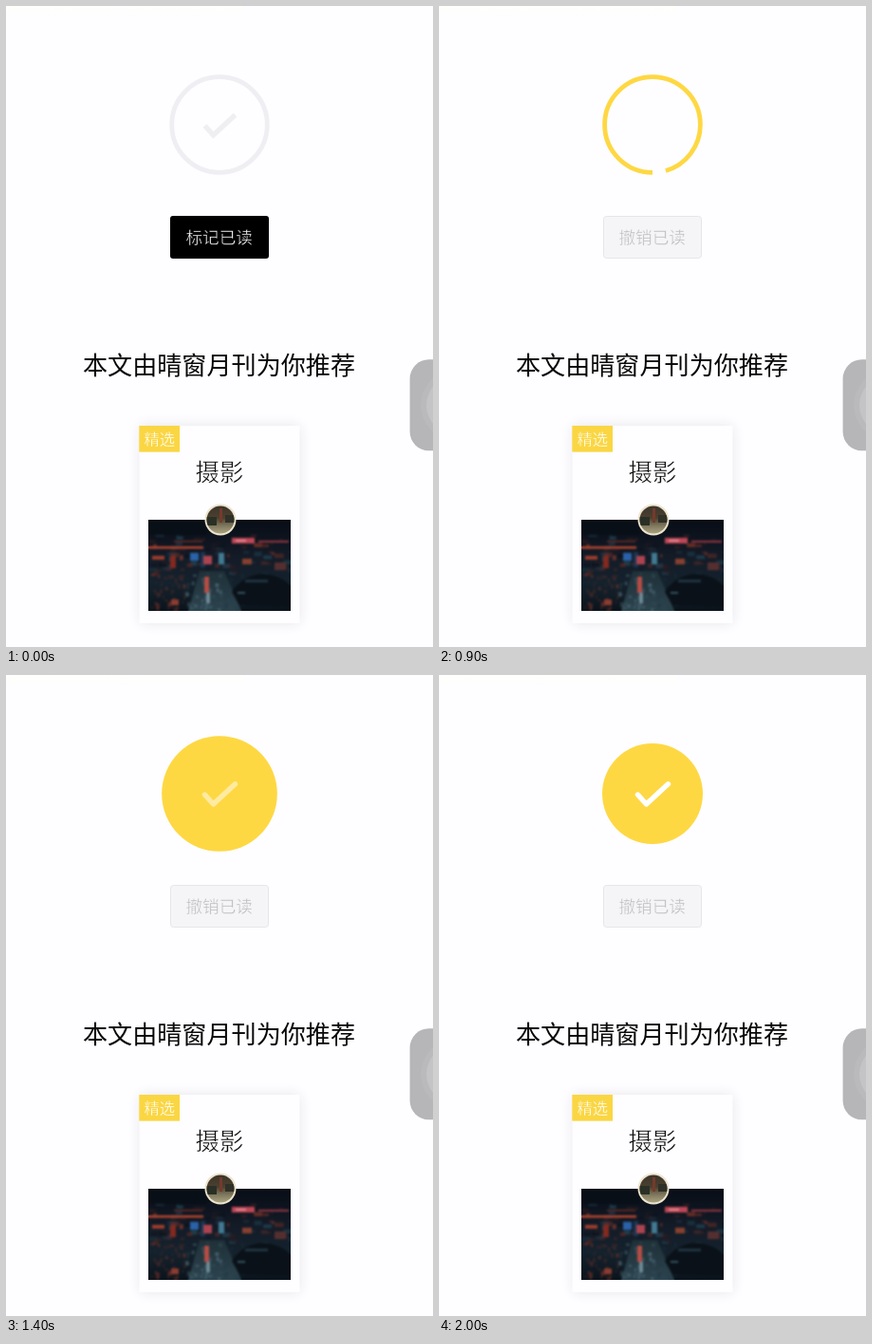
Animation, 450 px wide and 675 px high, one loop 2100 ms. Source, as an HTML page with a canvas:

```html
<!DOCTYPE html>
<html lang="zh-CN">
<head>
<meta charset="utf-8">
<title>标记已读</title>
<style>
html, body { margin: 0; width: 100%; height: 100%; overflow: hidden; background: #fefdff; }
canvas { display: block; width: 450px; height: 675px; }
</style>
</head>
<body>
<canvas id="stage" width="450" height="675"></canvas>
<script>
const ctx = document.getElementById('stage').getContext('2d');
const LOOP = 2100, STEP = 100;
const CX = 225, CY = 125, R = 53;
const YELLOW = '#fed843';
const FONT = '"Noto Sans CJK SC", "Noto Sans CJK", "Noto Sans", sans-serif';

const clamp = v => Math.max(0, Math.min(1, v));
const span = (t, a, b) => clamp((t - a) / (b - a));
const smooth = p => p * p * (3 - 2 * p);

function rect(x, y, w, h, fill, c = ctx) {
  c.fillStyle = fill;
  c.fillRect(x, y, w, h);
}

function roundRect(x, y, w, h, r, fill, stroke) {
  ctx.beginPath();
  ctx.roundRect(x, y, w, h, r);
  ctx.fillStyle = fill;
  ctx.fill();
  if (stroke) {
    ctx.strokeStyle = stroke;
    ctx.lineWidth = 1;
    ctx.stroke();
  }
}

function disc(x, y, r, fill) {
  ctx.beginPath();
  ctx.arc(x, y, r, 0, Math.PI * 2);
  ctx.fillStyle = fill;
  ctx.fill();
}

function arc(r, from, sweep, color, width) {
  ctx.beginPath();
  ctx.arc(CX, CY, r, from, from + sweep);
  ctx.strokeStyle = color;
  ctx.lineWidth = width;
  ctx.lineCap = 'butt';
  ctx.stroke();
}

// Centres the glyph boxes on (x, y); a ground colour trims the strokes to a light weight
function text(str, x, y, size, color, ground) {
  const base = y + size * 0.38;
  ctx.font = `${size}px ${FONT}`;
  ctx.textAlign = 'center';
  ctx.textBaseline = 'alphabetic';
  ctx.fillStyle = color;
  ctx.fillText(str, x, base);
  if (ground) {
    ctx.strokeStyle = ground;
    ctx.lineWidth = size * 0.02;
    ctx.strokeText(str, x, base);
  }
}

function check(color, alpha, cap) {
  ctx.save();
  ctx.globalAlpha = alpha;
  ctx.beginPath();
  ctx.moveTo(209.5, 126);
  ctx.lineTo(218.5, 136);
  ctx.lineTo(241.5, 114.8);
  ctx.strokeStyle = color;
  ctx.lineWidth = 5.4;
  ctx.lineCap = cap;
  ctx.lineJoin = cap === 'round' ? 'round' : 'miter';
  ctx.stroke();
  ctx.restore();
}

function seeded(seed) {
  return () => (seed = (seed * 16807) % 2147483647) / 2147483647;
}

function layer(w, h) {
  const el = document.createElement('canvas');
  el.width = w;
  el.height = h;
  return el;
}

// Night street reduced to soft blocks of its main tones
function paintStreet(w, h) {
  const sharp = layer(w, h);
  const c = sharp.getContext('2d');
  const rnd = seeded(421);
  const pick = list => list[Math.floor(rnd() * list.length)];
  const box = (x, y, bw, bh, fill) => rect(x, y, bw, bh, fill, c);

  const base = c.createLinearGradient(0, 0, 0, h);
  base.addColorStop(0, '#080d16');
  base.addColorStop(0.4, '#131b27');
  base.addColorStop(0.7, '#14222d');
  base.addColorStop(1, '#0b141c');
  box(0, 0, w, h, base);

  const wet = c.createLinearGradient(0, 54, 0, h);
  wet.addColorStop(0, '#1f3038');
  wet.addColorStop(1, '#2c444f');
  c.fillStyle = wet;
  c.beginPath();
  c.moveTo(54, 54);
  c.lineTo(80, 54);
  c.lineTo(98, h);
  c.lineTo(42, h);
  c.fill();

  // dim windows and stalls
  for (let i = 0; i < 80; i++) {
    c.globalAlpha = 0.35 + rnd() * 0.5;
    box(rnd() * w, 15 + rnd() * 42, 2 + rnd() * 8, 1 + rnd() * 4,
      pick(['#5a2722', '#7c3328', '#22384a', '#2e1a1e', '#1f4252', '#0c121a']));
  }
  // wet reflections
  for (let i = 0; i < 110; i++) {
    const x = rnd() * 100;
    const tone = x < 38 ? '#7a3329' : x < 78 ? '#5d7d8a' : '#1d3542';
    c.globalAlpha = 0.2 + rnd() * 0.45;
    box(x, 56 + rnd() * 38, 1 + rnd() * 3, 1 + rnd() * 4, tone);
  }
  c.globalAlpha = 1;

  box(0, 0, 62, 16, '#090f17');
  box(0, 28, 58, 2.5, '#b4452e');
  box(27, 22, 30, 1.5, '#6c2c25');
  box(4, 38, 13, 4, '#9d3c2b');
  box(23, 38, 6, 13, '#83291f');
  box(44, 35, 9, 8, '#2a61a8');
  box(55, 34, 5, 16, '#1b3551');
  box(58, 38, 9, 9, '#ae4350');
  box(74, 35, 6, 12, '#427a92');
  box(59, 60, 5, 17, '#b54d45');
  box(61, 77, 4, 11, '#6d8a96');
  box(24, 84, 8, 6, '#8c3c30');
  box(88, 19, 24, 6, '#bd4656');
  box(92, 21, 11, 2, '#e28b92');
  box(116, 22, 32, 2, '#8f3541');
  box(133, 45, 12, 8, '#552f30');
  box(99, 41, 10, 6, '#86402f');

  // parked car
  c.fillStyle = '#0a1118';
  c.beginPath();
  c.moveTo(88, 76);
  c.quadraticCurveTo(100, 57, 123, 57);
  c.quadraticCurveTo(143, 60, 150, 70);
  c.lineTo(150, 92);
  c.lineTo(96, 90);
  c.fill();
  box(102, 63, 24, 3, '#1f3340');
  box(94, 76, 8, 2, '#345260');

  const soft = layer(w, h);
  const s = soft.getContext('2d');
  s.drawImage(sharp, 0, 0);
  s.filter = 'blur(0.9px)';
  s.drawImage(sharp, 0, 0);
  return soft;
}

const street = paintStreet(150, 96);

function avatar(x, y) {
  disc(x, y, 16.5, '#eee5cf');
  const g = ctx.createLinearGradient(x, y - 15, x, y + 15);
  g.addColorStop(0, '#3a342a');
  g.addColorStop(0.45, '#4d4130');
  g.addColorStop(0.7, '#7d765c');
  g.addColorStop(1, '#aba482');
  disc(x, y, 14.5, g);
  ctx.save();
  ctx.beginPath();
  ctx.arc(x, y, 14.5, 0, Math.PI * 2);
  ctx.clip();
  rect(x - 1, y - 12, 3, 15, '#743a2b');
  rect(x - 15, y - 3, 11, 9, '#2b3026');
  rect(x + 5, y - 5, 10, 8, '#2f3027');
  ctx.restore();
}

function floatButton() {
  roundRect(425.6, 372.3, 96, 96, 20, '#b6b5b7');
  disc(474, 420.3, 37, '#bab9bb');
  disc(474, 420.3, 31, '#c4c3c5');
}

function card() {
  ctx.save();
  ctx.shadowColor = 'rgba(40,35,65,.11)';
  ctx.shadowBlur = 13;
  rect(140.5, 442, 169, 208, '#fefdff');
  ctx.restore();
  rect(140.3, 442, 42.7, 27.6, '#fad643');
  text('精选', 161.8, 455.8, 16.3, '#fff', '#fad643');
  text('摄影', 225, 490.5, 25.5, '#0c0c0c', '#fefdff');
  ctx.drawImage(street, 150, 541);
  avatar(226, 541);
}

function topGlow() {
  const g = ctx.createLinearGradient(0, 0, 0, 12);
  g.addColorStop(0, '#fffffc');
  g.addColorStop(1, '#fefdff');
  rect(0, 0, 250, 12, g);
}

function button(done) {
  if (done) {
    roundRect(173.5, 221.5, 103, 44, 3, '#f5f4f7', '#e6e5e8');
    text('撤销已读', 224.7, 243.7, 17.6, '#bfbec1', '#f5f4f7');
  } else {
    roundRect(173, 221, 104, 45, 3, '#000');
    text('标记已读', 224.7, 243.7, 17.6, '#f4f4f4', '#000');
  }
}

function badge(t) {
  const rest = 1 - span(t, 400, 700) * 1.4;
  if (rest > 0) {
    ctx.globalAlpha = rest;
    arc(50.3, 0, Math.PI * 2, '#efeff3', 4.8);
    ctx.globalAlpha = 1;
    check('#efeff2', rest, 'butt');
  }
  if (t < 500) return;

  if (t < 1000) {
    const sweep = 47 + 297 * span(t, 500, 900);
    arc(50.4, Math.PI / 2, sweep * Math.PI / 180, YELLOW, 4.8);
    return;
  }

  // the ring closes inward, then the disc pops and settles
  const hole = 48 * (1 - span(t, 925, 1152));
  const up = smooth(span(t, 1200, 1500));
  const down = 1 - Math.pow(1 - span(t, 1500, 1900), 2.6);
  const r = R * (1 + 0.2 * up * (1 - down));
  ctx.beginPath();
  ctx.arc(CX, CY, r, 0, Math.PI * 2);
  if (hole > 0) ctx.arc(CX, CY, hole, 0, Math.PI * 2, true);
  ctx.fillStyle = YELLOW;
  ctx.fill();
  check('#fff', span(t, 1200, 1600), 'round');
}

function draw(t) {
  rect(0, 0, 450, 675, '#fefdff');
  topGlow();
  badge(t);
  button(t >= 500);
  text('本文由晴窗月刊为你推荐', 224.5, 378.5, 26.1, '#080808');
  card();
  floatButton();
}

const start = performance.now();
function tick() {
  const t = (performance.now() - start) % LOOP;
  draw(Math.floor(t / STEP) * STEP);
  requestAnimationFrame(tick);
}
tick();
</script>
</body>
</html>
```
